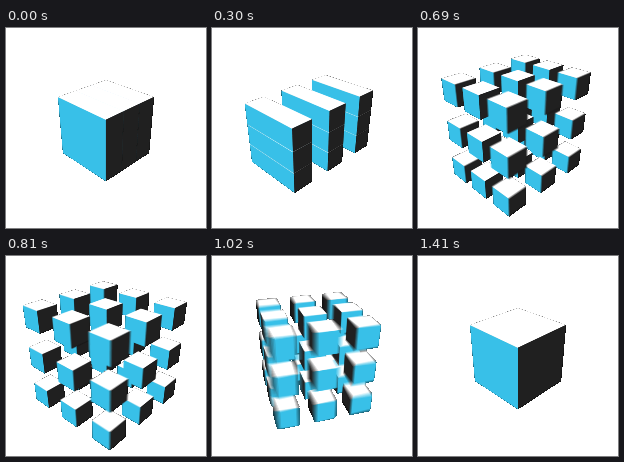
Recreate the animation shown at these times as an HTML page with a canvas. Size 200x200 px, loop 1650 ms.

```html
<!DOCTYPE html>
<html lang="en">
<head>
<meta charset="utf-8">
<title>Splitting cube</title>
<style>
  html, body { margin: 0; width: 100%; height: 100%; overflow: hidden; background: #fff; }
  canvas { display: block; width: 200px; height: 200px; }
</style>
</head>
<body>
<canvas id="stage"></canvas>
<script>
const SIZE = 200, LOOP = 1650, STEP = 30, REST = 1410;
const BLUE = '#38bde4', DARK = '#191919', WHITE = '#fff';
const GAP = 2 / 3;

// Motion blur: exposure in ms, samples per exposure, alpha that counts as solid.
const SHUTTER = 18, SAMPLES = 8, SOLID = 128;

// Camera: distance, focal scale, screen centre and elevation.
const DIST = 9, FOCAL = 288.7, CX = 100, CY = 98.5;
const SIN = 0.493, COS = 0.87;

function context(canvas) {
  canvas.width = canvas.height = SIZE;
  return canvas.getContext('2d', { willReadFrequently: true });
}
const stage = context(document.getElementById('stage'));
const pen = context(document.createElement('canvas'));
const blend = context(document.createElement('canvas'));
blend.globalCompositeOperation = 'lighter';
blend.globalAlpha = 1 / SAMPLES;

// Quadratic ease in and out, from 0 to 1 between two times.
function ease(t, from, to) {
  const p = Math.min(1, Math.max(0, (t - from) / (to - from)));
  return p < 0.5 ? 2 * p * p : 1 - 2 * (1 - p) ** 2;
}

function project([x, y, z]) {
  const k = FOCAL / (DIST - z * COS - y * SIN);
  return [CX + x * k, CY - (y * COS - z * SIN) * k];
}

// Pieces along one axis: whole while closed, thirds once open.
function split(gap) {
  if (gap < 1e-4) return [{ mid: 0, half: 1 }];
  return [-1, 0, 1].map(i => ({ mid: i * (2 / 3 + gap), half: 1 / 3 }));
}

function fillFace(points, color) {
  pen.beginPath();
  points.forEach(([x, y]) => pen.lineTo(x, y));
  pen.closePath();
  pen.fillStyle = color;
  pen.fill();
  pen.fill(); // closes the soft seam between neighbouring faces
}

// One sharp view of the boxes on a clear canvas.
function drawBoxes(t) {
  const turn = ease(t, 760, REST);
  const open = GAP * (1 - turn);
  const parts = [
    ease(t, 0, 300),
    ease(t, 282, 582),
    ease(t, 550, 850)
  ].map(e => split(open * e));

  const yaw = Math.PI * (turn + 0.25);
  const c = Math.cos(yaw), s = Math.sin(yaw);
  const toWorld = ([u, y, v]) => [u * c + v * s, y, v * c - u * s];
  const camera = [-DIST * COS * s, DIST * SIN, DIST * COS * c];

  const boxes = [];
  for (const a of parts[0]) for (const b of parts[1]) for (const d of parts[2]) {
    const mid = [a.mid, b.mid, d.mid];
    boxes.push({
      mid,
      half: [a.half, b.half, d.half],
      far: Math.hypot(...mid.map((m, i) => m - camera[i]))
    });
  }
  boxes.sort((p, q) => q.far - p.far);

  pen.clearRect(0, 0, SIZE, SIZE);
  for (const { mid, half } of boxes) {
    for (let axis = 0; axis < 3; axis++) {
      for (const side of [-1, 1]) {
        const plane = mid[axis] + side * half[axis];
        if ((camera[axis] - plane) * side <= 0) continue;
        const i = (axis + 1) % 3, j = (axis + 2) % 3;
        const points = [[-1, -1], [1, -1], [1, 1], [-1, 1]].map(([m, n]) => {
          const p = [];
          p[axis] = plane;
          p[i] = mid[i] + m * half[i];
          p[j] = mid[j] + n * half[j];
          return project(toWorld(p));
        });
        fillFace(points, [BLUE, WHITE, DARK][axis]);
      }
    }
  }
}

// Average the samples; soft edges turn dark where solid, white elsewhere.
function drawFrame(t) {
  blend.clearRect(0, 0, SIZE, SIZE);
  for (let i = 0; i < SAMPLES; i++) {
    drawBoxes(t + SHUTTER * i / SAMPLES);
    blend.drawImage(pen.canvas, 0, 0);
  }
  const image = blend.getImageData(0, 0, SIZE, SIZE);
  const px = image.data;
  for (let i = 0; i < px.length; i += 4) {
    const alpha = px[i + 3];
    for (let k = i; k < i + 3; k++) {
      px[k] = alpha < SOLID ? 255 : px[k] * alpha / 255;
    }
    px[i + 3] = 255;
  }
  stage.putImageData(image, 0, 0);
}

const start = performance.now();
let shown = -1;
function tick() {
  const t = (performance.now() - start) % LOOP;
  const frame = Math.min(REST, Math.floor(t / STEP) * STEP);
  if (frame !== shown) drawFrame(shown = frame);
  requestAnimationFrame(tick);
}
tick();
</script>
</body>
</html>
```
